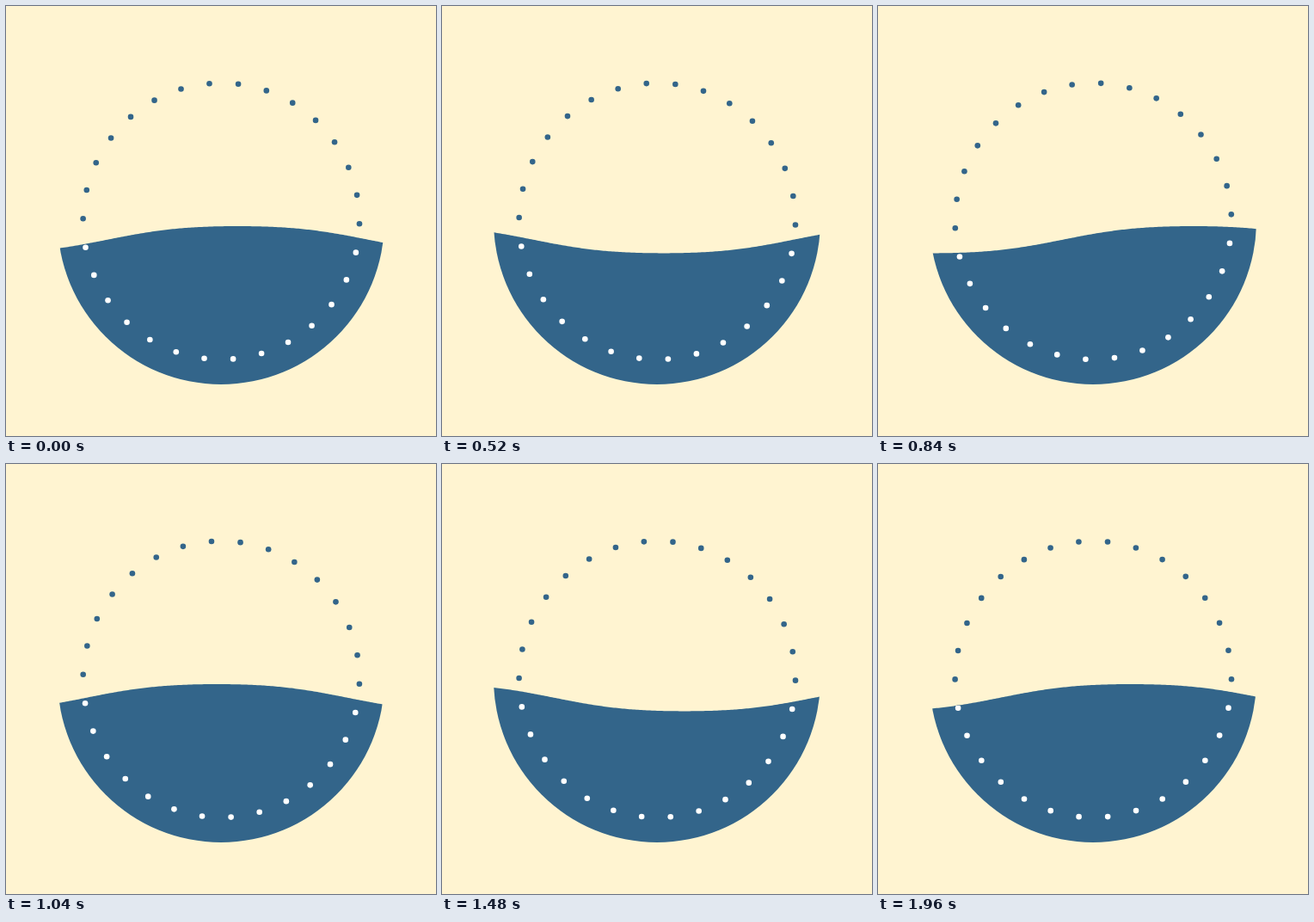
These frames come from a looping animation (500x500 px, 2040 ms). An HTML page with a canvas:

```html
<!DOCTYPE html>
<html>
<head>
<meta charset="utf-8">
<style>
html, body { margin: 0; width: 100%; height: 100%; overflow: hidden; background: #fff4d1; }
canvas { display: block; }
</style>
</head>
<body>
<canvas id="stage" width="500" height="500"></canvas>
<script>
const ctx = document.getElementById('stage').getContext('2d');
const TAU = Math.PI * 2, BLUE = '#33658a';
const LOOP = 2040, STEP = 40, LAST = 1960;
const WAVELENGTH = 606;

// Water surface: a wave with slightly flattened crests, moving left once per second
function surface(x, t) {
  const a = (x - 118 + WAVELENGTH * t / 1000) / WAVELENGTH * TAU;
  return 271.7 - 16.56 * Math.sin(a) - 0.86 * Math.sin(3 * a);
}

function dots(t, color) {
  const turn = (-178.93 + 0.02393 * t) * TAU / 360;
  ctx.fillStyle = color;
  for (let i = 0; i < 30; i++) {
    const a = turn + i * TAU / 30;
    ctx.beginPath();
    ctx.arc(250.3 + 160.7 * Math.cos(a), 250.3 + 160.7 * Math.sin(a), 3.3, 0, TAU);
    ctx.fill();
  }
}

function waterPath(t) {
  ctx.beginPath();
  ctx.moveTo(50, 450);
  for (let x = 50; x <= 450; x += 2) ctx.lineTo(x, surface(x, t));
  ctx.lineTo(450, 450);
  ctx.closePath();
}

function draw(t) {
  ctx.fillStyle = '#fff4d1';
  ctx.fillRect(0, 0, 500, 500);
  dots(t, BLUE);
  ctx.save();
  waterPath(t);
  ctx.clip();
  ctx.fillStyle = BLUE;
  ctx.beginPath();
  ctx.arc(250, 250, 190, 0, TAU);
  ctx.fill();
  dots(t, '#fff');
  ctx.restore();
}

const start = performance.now();
function tick() {
  const t = (performance.now() - start) % LOOP;
  draw(Math.min(Math.floor(t / STEP) * STEP, LAST));
  requestAnimationFrame(tick);
}
tick();
</script>
</body>
</html>
```
